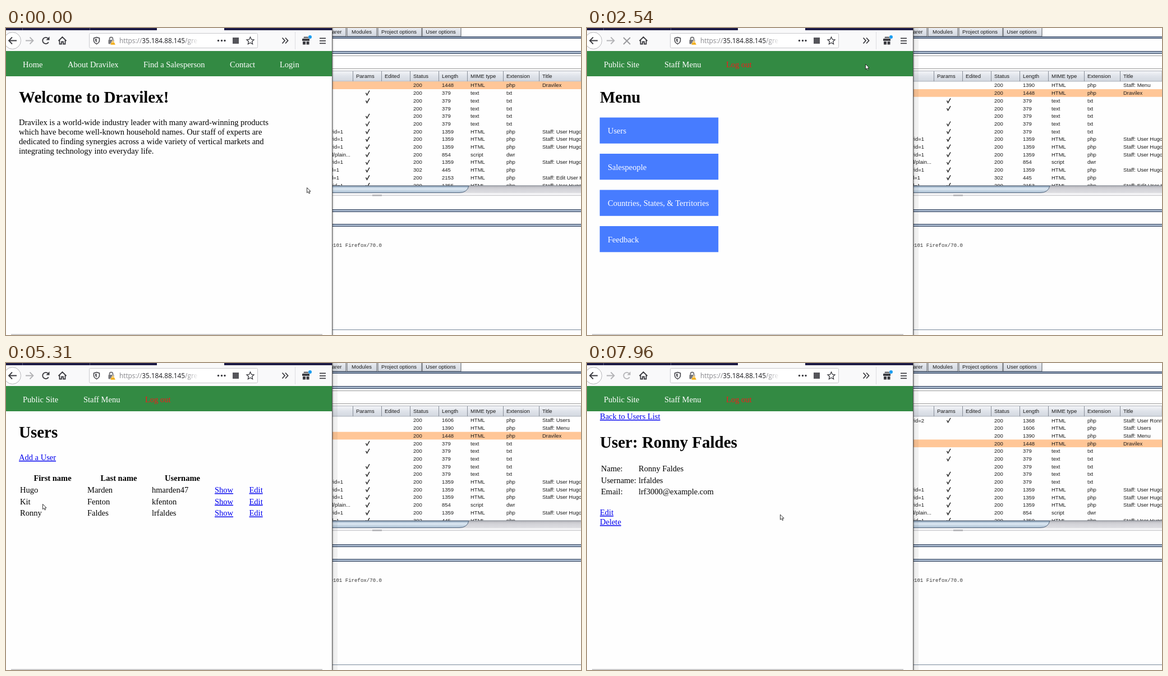
Recreate the animation shown at these times as an HTML page. Size 1025x547 px, loop 8000 ms.

```html
<!DOCTYPE html>
<html lang="en">
<head>
<meta charset="utf-8">
<title>Staff site walkthrough</title>
<style>
html, body { margin: 0; width: 100%; height: 100%; overflow: hidden; background: #fefefe }
svg { display: block; width: 100vw; height: 100vh }
text { white-space: pre }
.page { font: 14.5px "Liberation Serif", Times, serif }
.page .h1 { font-size: 29px; font-weight: bold }
.page .b { font-weight: bold; text-anchor: middle }
.page .a { fill: #00e; text-decoration: underline }
.page .w { fill: #fff }
.page .red { fill: #f01c1c }
.ui { font: 9.5px "Liberation Sans", Arial, sans-serif; fill: #1c1c1c }
.end { text-anchor: end }
.mid { text-anchor: middle }
.mono { font: 9.07px "Liberation Mono", Courier, monospace; fill: #333 }
.url { font: 11.8px "Open Sans", "Noto Sans", sans-serif; fill: #85858a }
.url tspan { fill: #1a1a1e }
.icon { fill: none; stroke: #3b3b40; stroke-width: 1.8 }
</style>
</head>
<body>
<svg id="stage" viewBox="0 0 1025 547"></svg>
<script>
const LOOP = 8000, STEP = 130, ROW = 13.7;
const stage = document.getElementById('stage');
const $ = id => document.getElementById(id);

const text = (x, y, s, cls = '') => `<text x="${x}" y="${y}" class="${cls}">${s}</text>`;
const rect = (x, y, w, h, fill, more = '') =>
  `<rect x="${x}" y="${y}" width="${w}" height="${h}" fill="${fill}" ${more}/>`;
const shape = (d, more = '') => `<path d="${d}" ${more}/>`;
const group = (id, body, more = '') => `<g id="${id}" ${more}>${body}</g>`;
const column = (x, y, dy, lines, cls) => lines.map((s, i) => text(x, y + dy * i, s, cls)).join('');
const gradient = (id, stops, dir) => `<linearGradient id="${id}" ${dir}>` +
  stops.map(([o, c, a = 1]) => `<stop offset="${o}" stop-color="${c}" stop-opacity="${a}"/>`).join('') +
  '</linearGradient>';
const DOWN = 'x2="0" y2="1"';

const defs = '<defs>' +
  gradient('head', [[0, '#f4f5f8'], [.5, '#dfe3ea'], [1, '#d3d8e0']], DOWN) +
  gradient('thumb', [[0, '#8fa6bd'], [.4, '#dfeaf4'], [1, '#a9bed2']], DOWN) +
  gradient('track', [[0, '#b4b4ba'], [.4, '#d2d2d7'], [1, '#dedee2']], DOWN) +
  gradient('fade', [[0, '#fff', 0], [1, '#fff']], '') +
  gradient('dark', [[0, '#000', .3], [1, '#000', 0]], '') +
  `<clipPath id="right">${rect(581, 0, 444, 547, '#fff')}</clipPath>` +
  `<clipPath id="list">${rect(581, 95, 444, 186, '#fff')}</clipPath></defs>`;

// Request list, newest first: address, ticked, status, length, type, extension, title
const staffTitle = 'Staff: User Hugo Marden';
const view = ['?id=1', 1, 200, 1359, 'HTML', 'php', staffTitle];
const asset = ticked => ['', ticked, 200, 379, 'text', 'txt', ''];
const requests = [
  ['?id=2', 1, 200, 1368, 'HTML', 'php', 'Staff: User Ronny Faldes'],
  ['', 0, 200, 1606, 'HTML', 'php', 'Staff: Users'],
  ['', 0, 200, 1390, 'HTML', 'php', 'Staff: Menu'],
  ['', 0, 200, 1448, 'HTML', 'php', 'Dravilex'],
  asset(1), asset(1), asset(0), asset(1), asset(1),
  view, view, view,
  ['l/plain...', 1, 200, 854, 'script', 'dwr', ''],
  view,
  ['id=1', 1, 302, 445, 'HTML', 'php', ''],
  ['id=1', 1, 200, 2153, 'HTML', 'php', 'Staff: Edit User Hugo'],
  ['?id=1', 1, 200, 1355, 'HTML', 'php', staffTitle]
];
const NEW = 3;

function requestRow([address, ticked, status, length, type, ext, title], i) {
  const y = 105.5 + ROW * i;
  const edge = address.startsWith('l/') ? 614 : address === 'id=1' ? 594 : 601;
  return (i === NEW ? rect(581, y - 10.2, 444, ROW, '#ffc697') : '') +
    text(edge, y, address, 'end') +
    (ticked ? shape(`M641.5 ${y - 3.5}l2 3.8 4.5-7.8`, 'fill="none" stroke="#222" stroke-width="1.4"') : '') +
    text(828, y, type) + text(892, y, ext) +
    group('reply' + i, text(726, y, status) + text(777, y, length) + text(956, y, title));
}

const band = (y, h = 5) => rect(581, y, 444, h, '#c3d3e6') +
  rect(581, y, 444, 1.4, '#3c4d68') + rect(581, y + h - 1.4, 444, 1.4, '#3c4d68');

function proxyWindow() {
  const tabs = [[575, 31, 'arer', 590], [608, 53, 'Modules', 634], [663, 78, 'Project options', 700.5], [742, 69, 'User options', 775]];
  const heads = [[624, 'Params'], [675, 'Edited'], [726, 'Status'], [777, 'Length'], [828, 'MIME type'], [892, 'Extension'], [956, 'Title']];
  return group('proxy', rect(581, 0, 444, 547, '#fefefe') +
    tabs.map(([x, w, s, mid]) => rect(x, -4, w, 19, 'url(#head)', 'stroke="#55585f"') + text(mid, 10, s, 'mid')).join('') +
    band(15, 4) + band(41) +
    rect(570, 49.5, 470, 23, '#fff', 'stroke="#999"') +
    rect(581, 76.5, 444, 18.5, 'url(#head)', 'stroke="#9aa0aa" stroke-width=".8"') +
    heads.map(([x, s]) => text(x, 89, s) + rect(x - 6, 77, 1, 18, '#888e98')).join('') +
    group('clip', group('rows', requests.map(requestRow).join('')), 'clip-path="url(#list)"') +
    rect(581, 281, 444, 13, 'url(#track)') + rect(581, 280.5, 444, 1, '#777c85') +
    shape('M575 281.5H825Q822 293.5 808 293.5H575Z', 'fill="url(#thumb)" stroke="#52657c"') +
    rect(581, 294, 444, 4, '#f3f3f5') + rect(581, 298, 444, 1, '#c4c4c8') + rect(653, 297, 17, 2.5, '#b0b0b4') +
    band(323) + band(349) +
    text(670, 390, '20100101 Firefox/70.0', 'mono end') +
    rect(581, 537, 444, 1.2, '#8a98a8'), 'class="ui" clip-path="url(#right)"') +
    group('shadow', rect(581, 0, 1, 547, '#777') + rect(581, 0, 4, 547, 'url(#dark)')) +
    group('focus', rect(581, 0, 10, 547, '#000', 'opacity=".05"'));
}

const icon = (d, more = '') => shape(d, 'class="icon" ' + more);
const ring = 'M75.8 25.2A5.6 5.6 0 1 1 74.8 18.4';
const tip = 'M77.5 15.3V21.4H71.4Z';

function browserBar() {
  return rect(0, 0, 581, 41, '#f9f9fa') +
    rect(0, 0, 269, 4, '#1c1a44') + rect(389, 0, 192, 4, '#1c1a44') +
    [29, 149].map(x => rect(x, 0, 1, 4, '#55547a')).join('') +
    '<circle cx="11.5" cy="22.5" r="15" fill="#fff" stroke="#b5b5b8"/>' +
    icon('M19 22.5H5M11 16.5L5 22.5 11 28.5') +
    icon('M35 22.5H48.5M42.5 16.5L48.5 22.5 42.5 28.5', 'style="stroke:#b3b3b6"') +
    group('reload', icon(ring) + shape(tip, 'fill="#3b3b40"')) +
    group('stop', icon('M65 17L77 29M77 17L65 29', 'style="stroke:#98989c"')) +
    group('tick', icon('M65.5 17L70 21.5', 'style="stroke:#98989c"')) +
    icon('M93.5 23L100.5 16 107.5 23M95.5 22V28.5H99V24.5H102V28.5H105.5V22') +
    rect(148.5, 9.5, 300, 26, '#fff', 'rx="2" stroke="#c9c9cd"') +
    icon('M161.5 16.5L166.5 18V22.5Q166 26.5 161.5 28.5 157 26.5 156.5 22.5V18Z', 'style="stroke-width:1.5"') +
    shape('M161.5 19V26Q159 24 159 19.5Z', 'fill="#3b3b40"') +
    icon('M184.5 21V19.5A3 3 0 0 1 190.5 19.5V21', 'style="stroke:#77777b"') + rect(182.5, 21, 10, 7.5, '#77777b', 'rx="1"') +
    shape('M190.5 21.5L195.5 30H185.5Z', 'fill="#f0a500" stroke="#fff" stroke-width=".8"') +
    rect(190, 24.3, 1.1, 3, '#fff') +
    text(202, 27, 'https://<tspan>35.184.88.145</tspan>/gre', 'url') + rect(322, 12, 22, 22, 'url(#fade)') +
    [378.5, 384.5, 390].map(x => `<circle cx="${x}" cy="22.5" r="1.7" fill="#3b3b40"/>`).join('') +
    rect(404, 17, 11, 11, '#55555a') +
    icon('M435.5 16L437.5 20.4 442 20.9 438.6 24 439.6 28.7 435.5 26.3 431.4 28.7 432.4 24 429 20.9 433.5 20.4Z', 'style="stroke-width:1.3"') +
    icon('M492.5 17.5L497 22.5 492.5 27.5M498 17.5L502.5 22.5 498 27.5') +
    rect(515, 7, 1, 31, '#dcdce0') +
    rect(528, 19, 13, 4, '#3b3b40') + rect(529, 24, 5, 5.5, '#3b3b40') + rect(535.5, 24, 5, 5.5, '#3b3b40') +
    icon('M531.5 18.5V16.5H534.7V18.5M534.7 18.5V16.5H538V18.5', 'style="stroke-width:1.3"') +
    '<circle cx="542" cy="16" r="3" fill="#1a9cf0"/>' +
    [17.5, 22, 26.5].map(y => rect(559, y, 11, 1.7, '#3b3b40')).join('');
}

const nav = items => rect(0, 41, 581, 45, '#338a43') +
  items.map(([x, s, cls = 'w']) => text(x, 70, s, cls)).join('');
const staffNav = nav([[30, 'Public Site'], [138, 'Staff Menu'], [248, 'Log out', 'red']]);

const pages = {
  home: nav([[30, 'Home'], [110, 'About Dravilex'], [245, 'Find a Salesperson'], [399, 'Contact'], [488, 'Login']]) +
    text(23, 133, 'Welcome to Dravilex!', 'h1') +
    column(23, 173, 17, [
      'Dravilex is a world-wide industry leader with many award-winning products',
      'which have become well-known household names. Our staff of experts are',
      'dedicated to finding synergies across a wide variety of vertical markets and',
      'integrating technology into everyday life.']),
  menu: staffNav + text(23, 133, 'Menu', 'h1') +
    ['Users', 'Salespeople', 'Countries, States, &amp; Territories', 'Feedback'].map((s, i) =>
      rect(22.7, 159.5 + 64.5 * i, 211.5, 46.3, '#477cff', `id="button${i}"`) + text(37, 188 + 64.5 * i, s, 'w')).join(''),
  users: staffNav + text(23, 133, 'Users', 'h1') + text(23, 173, 'Add a User', 'a') +
    text(83, 210, 'First name', 'b') + text(201, 210, 'Last name', 'b') + text(314.5, 210, 'Username', 'b') +
    column(25, 231, 20.7, ['Hugo', 'Kit', 'Ronny']) +
    column(145, 231, 20.7, ['Marden', 'Fenton', 'Faldes']) +
    column(260, 231, 20.7, ['hmarden47', 'kfenton', 'lrfaldes']) +
    column(372, 231, 20.7, ['Show', 'Show', 'Show'], 'a') +
    column(433.5, 231, 20.7, ['Edit', 'Edit', 'Edit'], 'a'),
  user: staffNav + text(23, 100, 'Back to Users List', 'a') +
    text(23, 151, 'User: Ronny Faldes', 'h1') +
    column(25, 193, 20.7, ['Name:', 'Username:', 'Email:']) +
    column(92, 193, 20.7, ['Ronny Faldes', 'lrfaldes', 'lrf3000@example.com']) +
    column(23, 271, 17, ['Edit', 'Delete'], 'a')
};

const outline = 'fill="#fff" stroke="#222" stroke-width=".9" stroke-linejoin="round"';
const cursor = group('cursor',
  shape('M0 .5V9.6L2.2 7.7 3.7 11 5.2 10.3 3.8 7.1H6.6Z', `id="arrow" ${outline}`) +
  shape('M-1.3 .8Q0-.3 1 .8V5L4 5.5Q5.3 5.8 5.2 7.3L4.6 10.5 3.6 12.8H-1.5L-4.3 8.8Q-4.6 7-3 7.4L-1.3 8.8Z', `id="hand" ${outline}`));

stage.innerHTML = defs + proxyWindow() + rect(0, 0, 581, 547, '#fefefe') + browserBar() +
  Object.entries(pages).map(([id, body]) => group(id, body, 'class="page"')).join('') +
  rect(9, 545.6, 555, 1, '#a0a0a4') +
  rect(-2, 542.5, 0, 8, '#f3f3f4', 'id="status" stroke="#c8c8cc"') + cursor;

// Timelines of [start, value]; each value holds until the next start
const timeline = {
  page: [[0, 'home'], [2410, 'menu'], [4790, 'users'], [7540, 'user']],
  count: [[0, 0], [2280, 1], [4400, 2], [7150, 3]],
  replies: [[0, 0], [2410, 1], [4660, 2], [7410, 3]],
  status: [[0, 0], [1620, 245], [2410, 0], [4270, 275], [4790, 0], [6480, 301], [7540, 0]],
  load: [[0, 'on'], [2280, 'tick'], [2410, 'stop'], [2670, 'off'], [2830, 'on'], [4530, 'tick'], [4660, 'stop'],
    [5050, 'off'], [5180, 'on'], [7280, 'tick'], [7410, 'stop'], [7680, 'off']]
};
const at = (name, t) => timeline[name].filter(([start]) => start <= t).pop()[1];

// Pointer moves: start, number of steps, x, y
const moves = [
  [270, 1, 525, 269], [420, 1, 521, 86], [560, 1, 534, 70], [690, 3, 474, 66], [1350, 1, 496.5, 64],
  [2830, 7, 190, 189], [3740, 1, 88, 189], [4920, 2, 65.5, 251], [5440, 5, 370, 273],
  [6090, 2, 381.5, 269.5], [7830, 2, 344.5, 269.5]
];

function pointer(t) {
  let x = 536.5, y = 284;
  for (const [start, steps, toX, toY] of moves) {
    if (t < start) break;
    const p = Math.min(1, (Math.floor((t - start) / STEP) + 1) / steps);
    x += (toX - x) * p;
    y += (toY - y) * p;
  }
  return [x, y];
}

const targets = { home: [488, 56, 35, 20], menu: [23, 159, 211, 47], users: [372, 261, 34, 15] };
function over(page, x, y) {
  if (!targets[page]) return false;
  const [left, top, w, h] = targets[page];
  return x >= left && x <= left + w && y >= top && y <= top + h;
}

const show = (id, on) => $(id).style.display = on ? '' : 'none';

function draw(now) {
  const t = now % LOOP, page = at('page', t), load = at('load', t);
  const count = at('count', t), replies = at('replies', t), status = at('status', t);
  const [x, y] = pointer(t), hit = over(page, x, y);

  for (const id in pages) show(id, id === page);
  $('rows').setAttribute('transform', `translate(0 ${(count - NEW) * ROW})`);
  for (let i = 0; i < NEW; i++) show('reply' + i, NEW - i <= replies);

  show('reload', load === 'on' || load === 'off');
  $('reload').style.opacity = load === 'off' ? .35 : 1;
  show('stop', load === 'stop');
  show('tick', load === 'tick');
  show('status', status);
  $('status').setAttribute('width', status + 2);
  show('focus', t >= 2020);

  $('button0').setAttribute('fill', hit ? '#3c6fe0' : '#477cff');
  $('cursor').setAttribute('transform', `translate(${x} ${y})`);
  show('hand', hit);
  show('arrow', !hit);
  requestAnimationFrame(frame);
}

let origin;
function frame(now) {
  origin ??= now;
  draw(now - origin);
}
draw(0);
</script>
</body>
</html>
```
